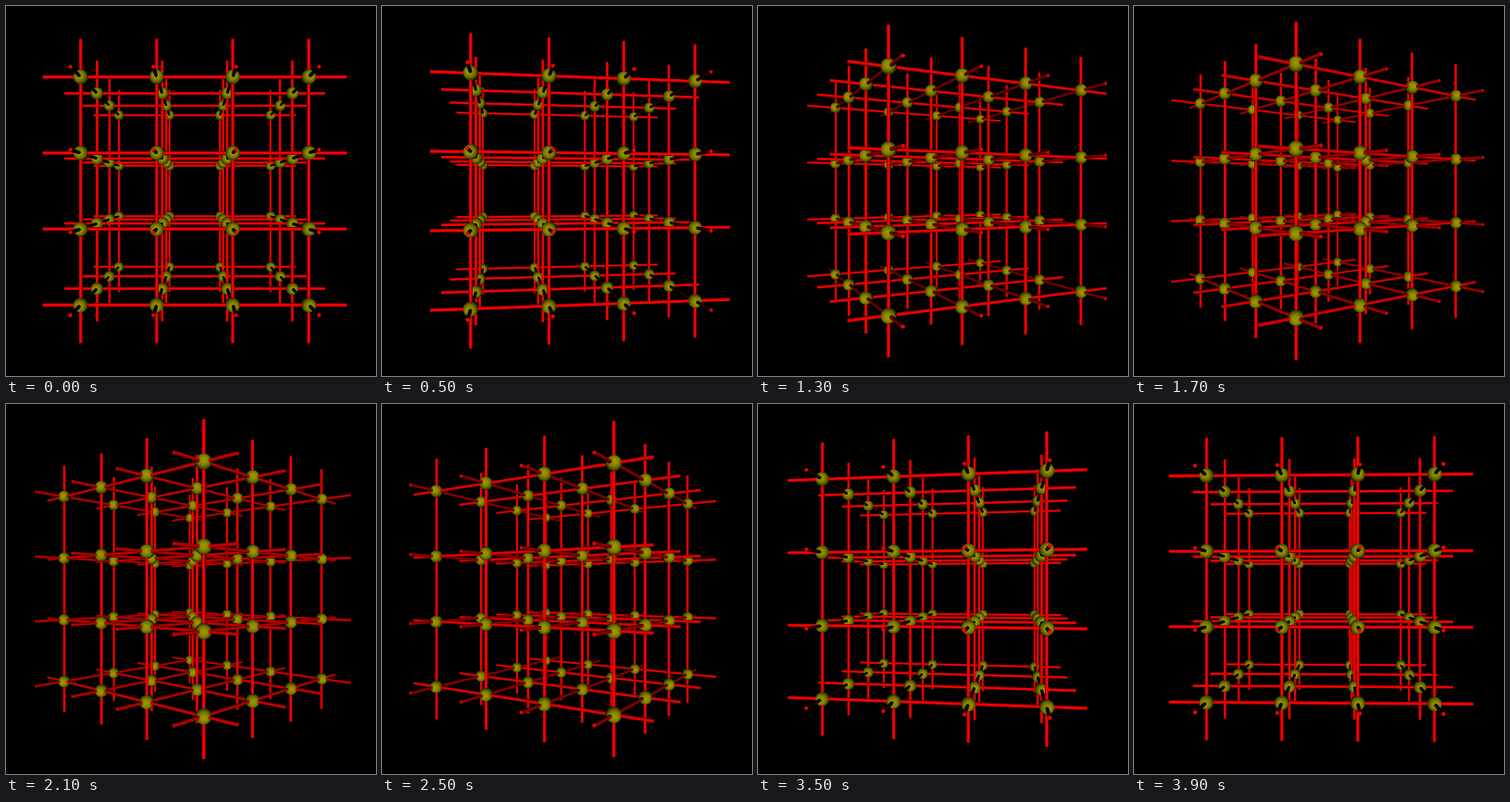
Recreate the animation shown at these times as an HTML page with a canvas. Size 400 by 400 pixels, loop 4000 ms.

```html
<!DOCTYPE html>
<html lang="en">
<head>
<meta charset="utf-8">
<title>Rotating lattice</title>
<style>
  html, body { margin: 0; width: 100%; height: 100%; overflow: hidden; background: #000; }
  canvas { display: block; width: 400px; height: 400px; }
</style>
</head>
<body>
<canvas id="stage" width="400" height="400"></canvas>
<script>
const SIZE = 400, SS = 2, W = SIZE * SS;
const FOCAL = 487.6 * SS, CX = 204 * SS, CY = 200 * SS, DISTANCE = 7.446;
const BALL = 0.098, ROD = 0.0225, HALF = 2;
const STEPS = 40, STEP_MS = 100;
const GRID = [-1.5, -0.5, 0.5, 1.5];

const ctx = document.getElementById('stage').getContext('2d');
const depth = new Float32Array(W * W);
const red = new Uint8Array(W * W), green = new Uint8Array(W * W);
let shade = 0; // brightness of the latest hit, lit along the view axis

const project = p => [CX + FOCAL * p[0] / p[2], CY + FOCAL * p[1] / p[2]];

// Casts rays through every pixel near the segment a-b and keeps the closest hits.
function trace(a, b, radius, r, g, hit) {
  const [ax, ay] = project(a), [bx, by] = project(b);
  const pad = radius * FOCAL / Math.min(a[2], b[2]) * 1.1 + 1;
  const ex = bx - ax, ey = by - ay, len2 = ex * ex + ey * ey || 1;
  const left = Math.max(0, Math.floor(Math.min(ax, bx) - pad));
  const right = Math.min(W - 1, Math.ceil(Math.max(ax, bx) + pad));
  const top = Math.max(0, Math.floor(Math.min(ay, by) - pad));
  const bottom = Math.min(W - 1, Math.ceil(Math.max(ay, by) + pad));
  for (let y = top; y <= bottom; y++) {
    for (let x = left; x <= right; x++) {
      const px = x + 0.5 - ax, py = y + 0.5 - ay;
      const u = Math.max(0, Math.min(1, (px * ex + py * ey) / len2));
      const qx = px - u * ex, qy = py - u * ey;
      if (qx * qx + qy * qy > pad * pad) continue;
      const t = hit((x + 0.5 - CX) / FOCAL, (y + 0.5 - CY) / FOCAL);
      const i = y * W + x;
      if (t < depth[i]) {
        depth[i] = t;
        const light = Math.max(0, shade);
        red[i] = Math.min(255, r * light);
        green[i] = g * light;
      }
    }
  }
}

function ball(c) {
  const [cx, cy, cz] = c, k = cx * cx + cy * cy + cz * cz - BALL * BALL;
  trace(c, c, BALL, 152, 152, (dx, dy) => {
    const dd = dx * dx + dy * dy + 1, dc = dx * cx + dy * cy + cz;
    const disc = dc * dc - dd * k;
    if (disc < 0) return Infinity;
    const t = (dc - Math.sqrt(disc)) / dd;
    shade = (cz - t) / BALL;
    return t;
  });
}

function rod(p, axis) {
  const [px, py, pz] = p, [ux, uy, uz] = axis;
  const end = s => [px + s * ux, py + s * uy, pz + s * uz];
  const a = end(-HALF), b = end(HALF);
  const pu = px * ux + py * uy + pz * uz;
  const k = px * px + py * py + pz * pz - pu * pu - ROD * ROD;
  trace(a, b, ROD, 275, 0, (dx, dy) => {
    const du = dx * ux + dy * uy + uz;
    const dd = dx * dx + dy * dy + 1 - du * du;
    const dp = dx * px + dy * py + pz - du * pu;
    const disc = dp * dp - dd * k;
    if (disc >= 0) {
      const t = (dp - Math.sqrt(disc)) / dd, s = t * du - pu;
      if (Math.abs(s) <= HALF) {
        shade = (pz + s * uz - t) / ROD;
        return t;
      }
    }
    // End cap facing the viewer
    const c = du > 0 ? a : b;
    const t = (c[0] * ux + c[1] * uy + c[2] * uz) / du;
    if (Math.hypot(t * dx - c[0], t * dy - c[1], t - c[2]) > ROD) return Infinity;
    shade = Math.abs(uz);
    return t;
  });
}

function render(step) {
  const s = step / STEPS, angle = Math.atan2(s, 1 - s);
  const sin = Math.sin(angle), cos = Math.cos(angle);
  const turn = (x, y, z) => [x * cos - z * sin, y, x * sin + z * cos];
  const place = (x, y, z) => {
    const p = turn(x, y, z);
    p[2] += DISTANCE;
    return p;
  };
  depth.fill(1e9);
  red.fill(0);
  green.fill(0);
  for (const i of GRID) {
    for (const j of GRID) {
      rod(place(0, i, j), turn(1, 0, 0));
      rod(place(i, 0, j), turn(0, 1, 0));
      rod(place(i, j, 0), turn(0, 0, 1));
      for (const k of GRID) ball(place(i, j, k));
    }
  }
  const image = ctx.createImageData(SIZE, SIZE);
  const average = (buf, i) => (buf[i] + buf[i + 1] + buf[i + W] + buf[i + W + 1]) / 4;
  for (let y = 0, o = 0; y < SIZE; y++) {
    for (let x = 0; x < SIZE; x++, o += 4) {
      const i = y * SS * W + x * SS;
      image.data[o] = average(red, i);
      image.data[o + 1] = average(green, i);
      image.data[o + 3] = 255;
    }
  }
  return image;
}

const cache = [];
let shown = -1;
const start = performance.now();

function tick() {
  const step = Math.floor((performance.now() - start) / STEP_MS) % STEPS;
  if (step !== shown) {
    cache[step] = cache[step] || render(step);
    ctx.putImageData(cache[step], 0, 0);
    shown = step;
  }
  requestAnimationFrame(tick);
}
tick();
</script>
</body>
</html>
```
